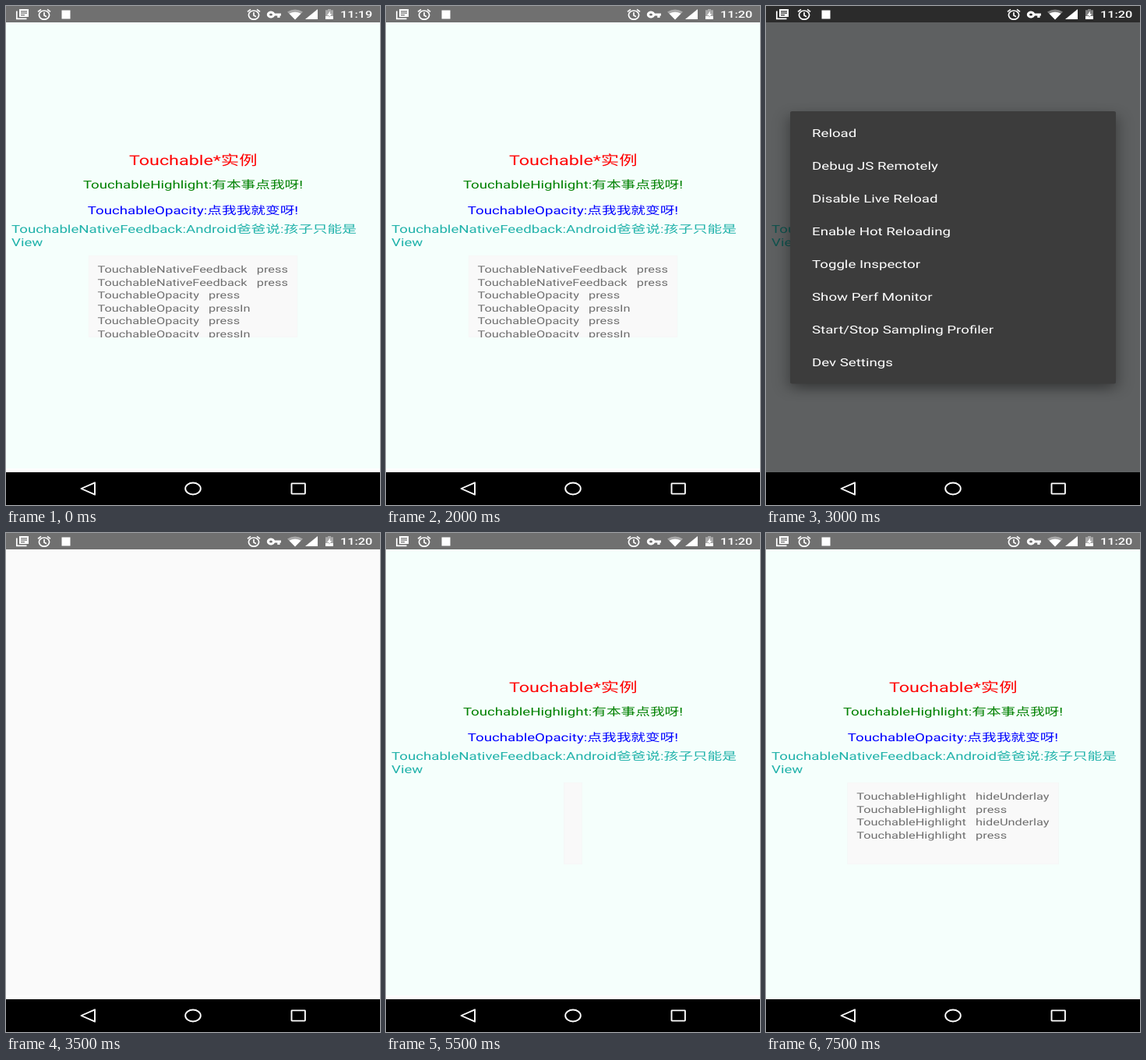
Recreate the animation shown at these times as an HTML page. Size 480 by 640 pixels, loop 8 s.

```html
<!DOCTYPE html>
<html lang="zh">
<head>
<meta charset="utf-8">
<title>Touchable</title>
<style>
  html, body { margin: 0; width: 100%; height: 100%; overflow: hidden; background: #000; }
  #stage { display: block; width: 100vw; height: 100vh; }
  text { font-family: Roboto, "Noto Sans CJK SC", "Noto Sans CJK", sans-serif; font-size: 16px; white-space: pre; text-rendering: geometricPrecision; }
  .mid { text-anchor: middle; }
  .log text { font-size: 14px; fill: #6f6f6f; }
  .log rect { fill: #f9f9f9; stroke: #f2f2f2; stroke-width: .7; }
  .icon { fill: none; stroke: #fff; stroke-width: 1.7; }
  .dialog { fill: #3c3c3c; filter: drop-shadow(0 7px 9px rgba(0, 0, 0, .42)); }

  /* every change is a hard cut within one 8 s loop */
  [class*="at-"], #bar, #page, #dim { animation: 8s step-end infinite; }
  #bar { animation-name: bar; }
  #page { animation-name: page; }
  #dim { animation-name: dim; }
  .at-old-time { animation-name: oldTime; }
  .at-new-time { animation-name: newTime; }
  .at-content { animation-name: content; }
  .at-menu { animation-name: menu; }
  .at-strip { animation-name: strip; }
  .at-full { animation-name: full; }
  .at-empty { animation-name: empty; }
  .at-first { animation-name: first; }
  .at-second { animation-name: second; }

  @keyframes bar { 0%, 43.75% { fill: #707070 } 31.25% { fill: #363636 } 37.5% { fill: #2b2b2b } }
  @keyframes page { 0%, 50% { fill: #f5fffc } 43.75% { fill: #fafafa } }
  @keyframes dim { 0% { fill: #787878 } 37.5% { fill: #5e6061 } }
  @keyframes oldTime { 0% { visibility: visible } 18.75%, 100% { visibility: hidden } }
  @keyframes newTime { 0% { visibility: hidden } 18.75%, 100% { visibility: visible } }
  @keyframes content { 0%, 50% { visibility: visible } 31.25% { visibility: hidden } }
  @keyframes menu { 0%, 43.75%, 100% { visibility: hidden } 31.25% { visibility: visible } }
  @keyframes strip { 0% { visibility: visible } 81.25%, 100% { visibility: hidden } }
  @keyframes full { 0% { visibility: visible } 31.25%, 100% { visibility: hidden } }
  @keyframes empty { 0%, 81.25%, 100% { visibility: hidden } 50% { visibility: visible } }
  @keyframes first { 0% { visibility: hidden } 81.25%, 100% { visibility: visible } }
  @keyframes second { 0% { visibility: hidden } 93.75%, 100% { visibility: visible } }
</style>
</head>
<body>
<svg id="stage" viewBox="0 0 480 640" preserveAspectRatio="none">
  <defs>
    <g id="alarm" class="icon">
      <ellipse rx="6.6" ry="5.6" cy=".6"/>
      <path d="M-8-3.6L-4-6.6M8-3.6L4-6.6M0-3V1L3 2.8"/>
    </g>
  </defs>

  <rect id="page" width="480" height="640"/>
  <rect class="at-strip" y="593" width="480" height="5" fill="#fdfdfd"/>

  <!-- the phone screen, in its own units, squeezed onto the stage -->
  <g transform="scale(1.16667 .875)">
    <g class="at-content">
      <text class="mid" x="205.9" y="233" style="font-size:20px" fill="#f00">Touchable*实例</text>
      <text class="mid" x="205.7" y="267" fill="#008000">TouchableHighlight:有本事点我呀!</text>
      <text class="mid" x="205.7" y="305.5" fill="#00f">TouchableOpacity:点我我就变呀!</text>
      <text x="6" y="333" fill="#20b2aa">TouchableNativeFeedback:Android爸爸说:孩子只能是<tspan x="6" dy="19">View</tspan></text>
    </g>

    <svg class="log at-full" x="90.7" y="365.7" width="230" height="120">
      <rect width="230" height="120"/>
      <text y="25.7"><tspan x="10">TouchableNativeFeedback   press</tspan><tspan x="10" dy="18.86">TouchableNativeFeedback   press</tspan><tspan x="10" dy="18.86">TouchableOpacity   press</tspan><tspan x="10" dy="18.86">TouchableOpacity   pressIn</tspan><tspan x="10" dy="18.86">TouchableOpacity   press</tspan><tspan x="10" dy="18.86">TouchableOpacity   pressIn</tspan></text>
    </svg>
    <svg class="log at-empty" x="195.7" y="365.7" width="20" height="120">
      <rect width="20" height="120"/>
    </svg>
    <svg class="log at-first" x="89.6" y="365.7" width="232.4" height="120">
      <rect width="232.4" height="120"/>
      <text y="25.7"><tspan x="10">TouchableHighlight   hideUnderlay</tspan><tspan x="10" dy="18.86">TouchableHighlight   press</tspan></text>
      <text class="at-second" y="63.4"><tspan x="10">TouchableHighlight   hideUnderlay</tspan><tspan x="10" dy="18.86">TouchableHighlight   press</tspan></text>
    </svg>

    <g class="at-menu">
      <rect id="dim" width="412" height="732"/>
      <text x="6" y="333" fill="#10534e">TouchableNative<tspan x="6" dy="19">View</tspan></text>
      <rect class="dialog" x="26.6" y="154.3" width="358.3" height="399.5" rx="2"/>
      <text y="192" fill="#fff"><tspan x="50.6">Reload</tspan><tspan x="50.6" dy="48">Debug JS Remotely</tspan><tspan x="50.6" dy="48">Disable Live Reload</tspan><tspan x="50.6" dy="48">Enable Hot Reloading</tspan><tspan x="50.6" dy="48">Toggle Inspector</tspan><tspan x="50.6" dy="48">Show Perf Monitor</tspan><tspan x="50.6" dy="48">Start/Stop Sampling Profiler</tspan><tspan x="50.6" dy="48">Dev Settings</tspan></text>
    </g>

    <rect id="bar" width="412" height="24"/>
    <g fill="#fff" text-anchor="end" font-weight="500">
      <text class="at-old-time" x="403.2" y="17.7" style="font-size:14px">11:19</text>
      <text class="at-new-time" x="403.2" y="17.7" style="font-size:14px">11:20</text>
    </g>
  </g>

  <!-- status icons -->
  <path d="M17 4H29V14H17ZM19 6.2V7.4H27V6.2ZM19 8.6V9.8H27V8.6ZM19 11V12.2H24V11Z" fill="#fff" fill-rule="evenodd"/>
  <path class="icon" d="M13.8 6.5V16.3H26.5"/>
  <use href="#alarm" x="49" y="11"/>
  <rect x="71.5" y="5.5" width="11" height="11" fill="#fff"/>
  <use href="#alarm" x="318" y="11"/>
  <path d="M345 9.4H353V12.6H351.5V15H348.3V12.6H345A5.3 4.4 0 1 1 345 9.4ZM338 11A2 1.6 0 1 0 342 11A2 1.6 0 1 0 338 11Z" fill="#fff" fill-rule="evenodd"/>
  <path d="M361 7.5Q371 1.5 381 7.5L371 17.5Z" fill="#fff" opacity=".4"/>
  <path d="M363.5 9.8Q371 5.8 378.5 9.8L371 17.5Z" fill="#fff"/>
  <path d="M384 17H400V4Z" fill="#fff"/>
  <path d="M410 5.3H413V4H417V5.3H420V17H410Z" fill="#fff" opacity=".4"/>
  <path d="M410 13H420V17H410ZM416 6.5L412 12H414.6V15L418 10H416Z" fill="#fff"/>

  <rect y="598" width="480" height="42"/>
  <g class="icon" style="stroke-width:1.9">
    <path d="M96.5 619L114 611.3V626.7Z" stroke-linejoin="round"/>
    <ellipse cx="240" cy="619" rx="9.8" ry="7.5"/>
    <rect x="366.5" y="612.4" width="17.4" height="13.2" rx=".5"/>
  </g>
</svg>
</body>
</html>
```
